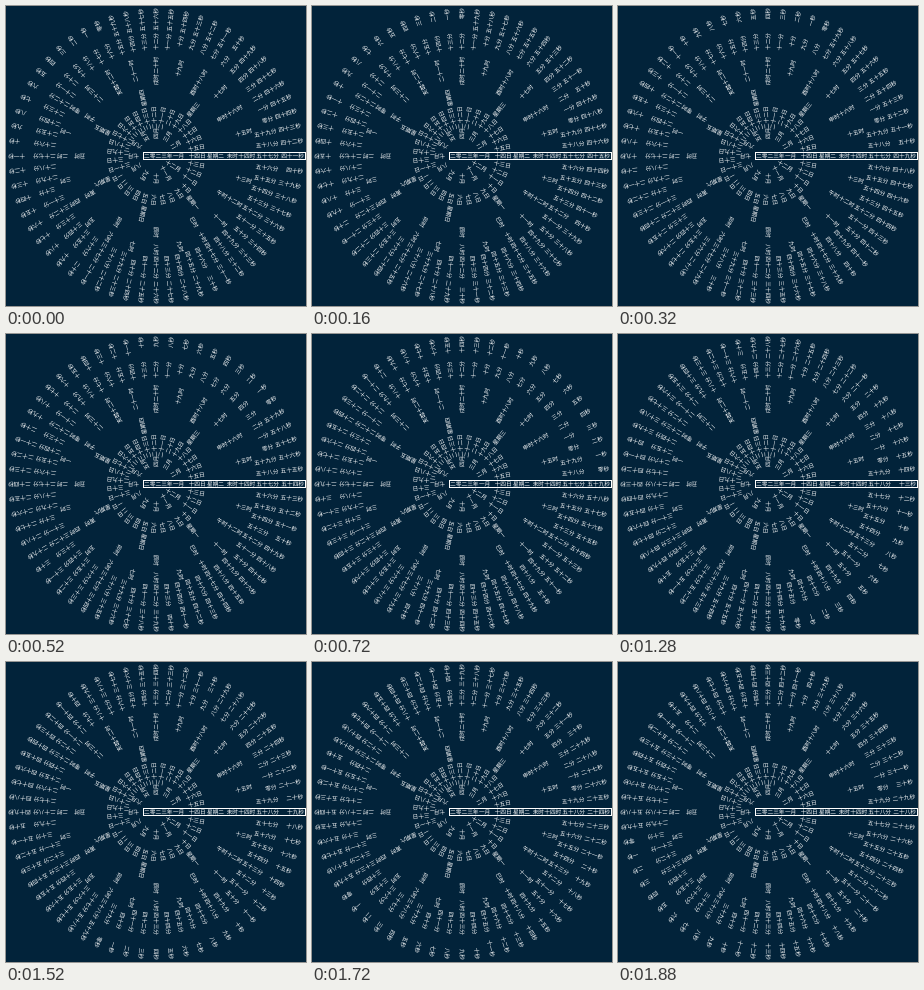
These frames come from a looping animation (300x300 px, 1.92 s). An HTML page with a canvas:

```html
<!DOCTYPE html>
<html lang="zh-CN">
<head>
<meta charset="utf-8">
<title>时钟</title>
<style>
html, body { margin: 0; width: 100%; height: 100%; overflow: hidden; background: #02233a; }
canvas { display: block; width: 300px; height: 300px; }
</style>
</head>
<body>
<canvas id="clock" width="300" height="300"></canvas>
<script>
const ctx = document.getElementById('clock').getContext('2d');
const TICK = 40, TICKS = 48;
const LEAD = 10; // keeps a late repaint from showing the previous tick
const START = 57 * 60 + 41;
const DIGITS = '零一二三四五六七八九';
const BRANCHES = '子丑寅卯辰巳午未申酉戌亥';
const WEEK = '日一二三四五六';

function numeral(n) {
  if (n < 10) return DIGITS[n];
  const tens = Math.floor(n / 10), ones = n % 10;
  return (tens > 1 ? DIGITS[tens] : '') + '十' + (ones ? DIGITS[ones] : '');
}

const counted = (unit, first = 0) => i => numeral(i + first) + unit;

// Labels end at the given radius; the current one points right.
function ring(count, current, radius, label) {
  for (let i = 0; i < count; i++) {
    ctx.save();
    ctx.translate(150, 150);
    ctx.rotate((current - i) * 2 * Math.PI / count);
    ctx.fillText(label(i), radius, 0);
    ctx.restore();
  }
}

function draw(tick) {
  const total = START + tick;
  ctx.fillStyle = '#02233a';
  ctx.fillRect(0, 0, 300, 300);

  ctx.font = '5.7px "Noto Sans CJK SC", "Noto Sans CJK", sans-serif';
  ctx.textRendering = 'geometricPrecision';
  ctx.textBaseline = 'middle';
  ctx.textAlign = 'right';
  ctx.fillStyle = '#fff';

  ctx.fillText('二零二三年', 166.5, 150);
  ring(12, 0, 28.3, counted('月', 1));
  ring(31, 13, 49.7, counted('日', 1));
  ring(7, 2, 68, i => '星期' + WEEK[i]);
  ring(12, 7, 82, i => BRANCHES[i] + '时');
  ring(24, 14, 99.3, counted('时'));
  ring(60, Math.floor(total / 60), 123, counted('分'));
  ring(60, total % 60, 148, counted('秒'));

  ctx.strokeStyle = '#fff';
  ctx.lineWidth = 1;
  ctx.strokeRect(137.5, 146.5, 162, 7);
}

function loop() {
  draw(Math.floor((performance.now() + LEAD) / TICK) % TICKS);
  requestAnimationFrame(loop);
}

loop();
</script>
</body>
</html>
```
